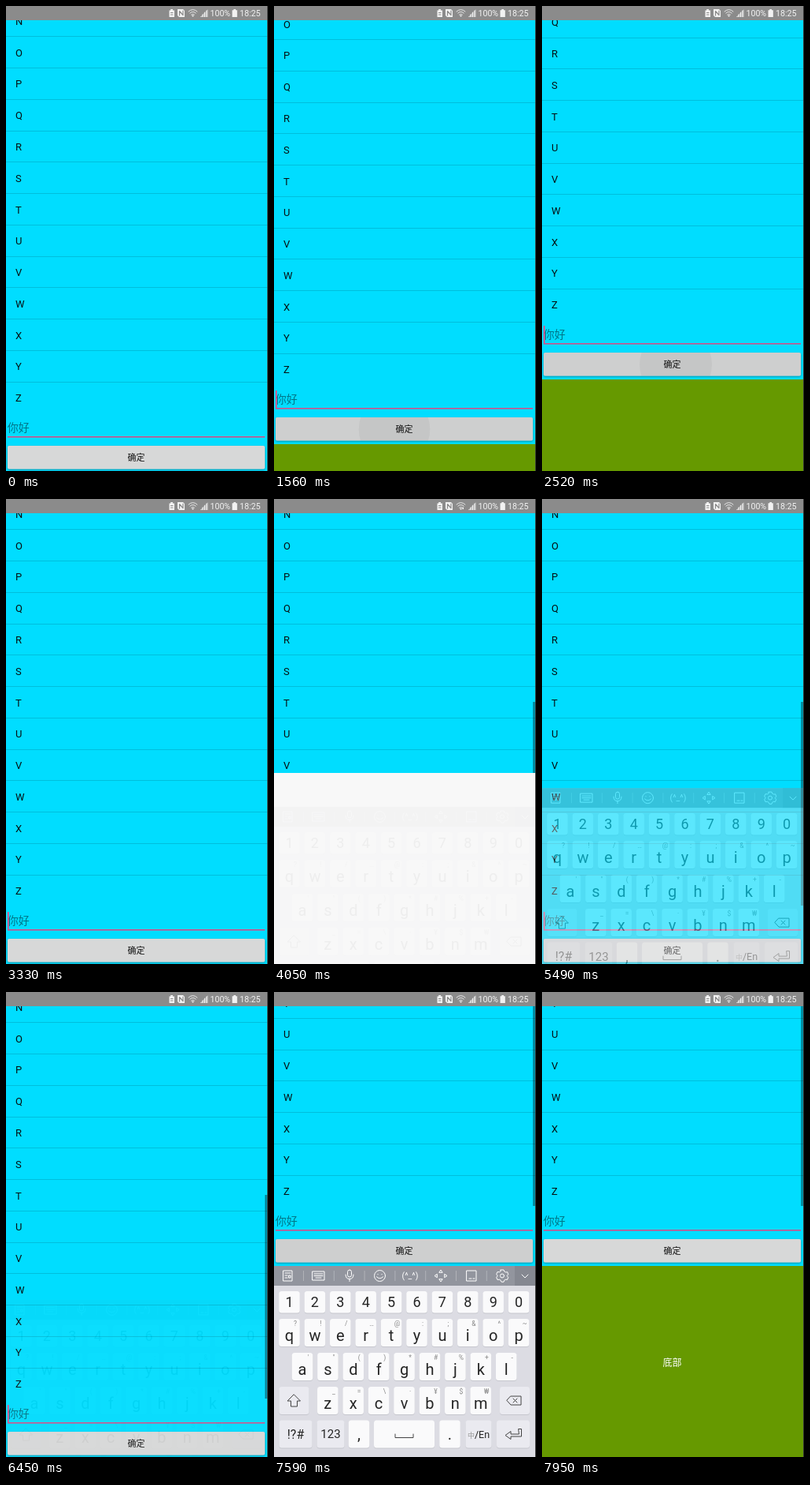
Write an HTML page that moves like this. It is 333 by 589 pixels and loops after 8000 ms.

```html
<!DOCTYPE html>
<html lang="zh-CN">
<head>
<meta charset="utf-8">
<title>List with bottom panel</title>
<style>
html, body { margin: 0; width: 100%; height: 100%; overflow: hidden; background: #f8f8f8; }
svg { display: block; width: 333px; height: 589px; }
text { font-family: Roboto, "Noto Sans CJK SC", "Noto Sans CJK", sans-serif; }
.mid { text-anchor: middle; }
.line { fill: none; stroke-linecap: round; stroke-linejoin: round; }
</style>
</head>
<body>
<svg viewBox="0 0 333 589">
  <defs>
    <clipPath id="windowClip"><rect id="windowRect" width="333" height="589"/></clipPath>
    <clipPath id="buttonClip"><rect x="2" y="557" width="327" height="29.5" rx="2"/></clipPath>
    <filter id="shadow" x="-5%" y="-30%" width="110%" height="180%">
      <feDropShadow dx="0" dy="1" stdDeviation="0.9" flood-opacity="0.4"/>
    </filter>
  </defs>
  <g clip-path="url(#windowClip)">
    <rect width="333" height="589" fill="#00ddff"/>
    <g id="content">
      <g id="rows"></g>
      <rect id="scrollbar" x="329" y="257" width="3" height="258" fill="#000" fill-opacity=".36"/>
      <text x="1.8" y="539" font-size="14" fill="#000" fill-opacity=".47">你好</text>
      <rect id="cursor" x="2" y="523" width="1.6" height="22" fill="#f0447f"/>
      <rect x="2" y="545" width="327" height="1.6" fill="#d0508a"/>
      <rect x="2" y="557" width="327" height="29.5" rx="2" fill="#d7d8d8" filter="url(#shadow)"/>
      <g clip-path="url(#buttonClip)">
        <rect id="pressed" x="2" y="557" width="327" height="30"/>
        <circle id="ripple" cy="572"/>
      </g>
      <text class="mid" x="165.5" y="576" font-size="11" fill="#111">确定</text>
    </g>
    <g id="panel">
      <rect width="333" height="244" fill="#669900"/>
      <text class="mid" x="165.5" y="127" font-size="12" fill="#fff">底部</text>
    </g>
  </g>
  <g id="keyboard"></g>
  <g id="status">
    <rect width="333" height="18" fill="#8b8b8b"/>
    <g fill="#f2f2f2">
      <path d="M207.5 5.5h1.7V4h2.8v1.5h2V14h-6.5z"/>
      <path d="M218 4h7l2 2v8h-7l-2-2z"/>
      <path d="M247 14l10-10v10z" fill-opacity=".35"/>
      <path d="M247 14l1.5-1.5V14zM249.3 14v-3l1.2-1.2V14zM251.8 14V8.5L253 7.3V14zM254.3 14V6l1.2-1.2V14z"/>
      <path d="M287.5 5.2h1.8V4h2.7v1.2h1.8V14h-6.3z"/>
      <text x="259.5" y="13.3" font-size="10.6">100%</text>
      <text x="297" y="13.3" font-size="10.6">18:25</text>
      <circle cx="237.5" cy="12.5" r="1.1"/>
      <rect id="traffic" x="239.5" y="10.5" width="1.5" height="2.5"/>
    </g>
    <g class="line" stroke="#8b8b8b" stroke-width="1.2">
      <path d="M220.5 12V6.5l4.5 5V6"/><path d="M209.5 8.5h2.5m-2.5 2.5h2.5"/>
    </g>
    <path class="line" stroke="#f2f2f2" stroke-width=".9" d="M232 7q5.5-5 11 0M233.8 9q3.7-3.3 7.4 0M235.6 11q1.9-1.7 3.8 0"/>
  </g>
  <rect x="332" width="1" height="589" fill="#333"/>
</svg>
<script>
const LOOP = 8000, TRAVEL = 244, STEP = 60, SLIDE = 300;
const KEY_PITCH = 32.4;
const $ = id => document.getElementById(id);
const set = (id, attrs) => {
  for (const name in attrs) $(id).setAttribute(name, attrs[name]);
};
const clamp = v => Math.min(1, Math.max(0, v));
const ease = v => (1 - Math.cos(Math.PI * clamp(v))) / 2;
const within = (t, spans) => spans.some(([from, to]) => t >= from && t < to);
const escapeText = s => s.replace(/&/g, '&amp;').replace(/</g, '&lt;');

function buildRows() {
  $('rows').innerHTML = [...'NOPQRSTUVWXYZ'].map((letter, i) => {
    const y = 19.3 + i * 39.77;
    const divider = letter === 'Z' ? '' :
      `<rect y="${Math.round(y + 19)}" width="333" height="1" fill="#00bedc"/>`;
    return `<text x="12" y="${y + 4.6}" font-size="13" fill="#051014">${letter}</text>${divider}`;
  }).join('');
}

function key(cx, y, w, h, label, { size = 20, control = false, hint = '' } = {}) {
  const x = cx - w / 2;
  const mark = hint &&
    `<text class="mid" x="${cx + 7.5}" y="${y + 8.5}" font-size="8.5" fill="#888">${escapeText(hint)}</text>`;
  return `<rect x="${x}" y="${y + 1}" width="${w}" height="${h}" rx="3.5" fill="#c6c7ce"/>
    <rect x="${x}" y="${y}" width="${w}" height="${h}" rx="3.5" fill="${control ? '#eaeaf0' : '#fafafb'}"/>
    <text class="mid" x="${cx}" y="${y + h / 2 + size * .36 + (hint ? 3 : 0)}" font-size="${size}" fill="#252525">${label}</text>${mark}`;
}

function keyRow(letters, hints, x, y, h, size) {
  return [...letters].map((letter, i) =>
    key(x + i * KEY_PITCH, y, 26.5, h, letter, { size, hint: hints[i] || '' })).join('');
}

function buildKeyboard() {
  const control = (cx, y, w, label = '', size = 16) =>
    key(cx, y, w, 35, label, { control: true, size });
  const separators = Array.from({ length: 7 }, (_, i) =>
    `<path d="M${37.5 + i * 38.8} 353v13" stroke="#b0b2b8"/>`).join('');
  const tools = `<g class="line" stroke="#fff">
    <path d="M12 353h11v13H12zM14 356h7m-7 3h3m-3 3h3m2-3h2v3h-2z"/>
    <path d="M49 354h15v11H49zM51 357h11m-11 2.5h11M53 362h7"/>
    <rect x="93.5" y="352" width="5" height="9" rx="2.5"/><path d="M91 358q0 5.5 5 5.5t5-5.5m-5 5.5v3"/>
    <circle cx="134.5" cy="359.5" r="7"/><path d="M132 357.5v.3m5-.3v.3m-6.5 3q4 4 8 0"/>
    <path d="M210 355l2-3 2 3zm0 9l2 3 2-3zM207 357.5l-3 2 3 2zm10 0l3 2-3 2z"/>
    <path d="M245 353h12v13h-12zM248 363h3m2 0h2"/>
    <circle cx="290" cy="359.5" r="2.5"/>
    <path d="M288 352h4l.7 2 2 1 2-.3 1 3-1.5 1.8 1.5 2-1.3 3-2.2-.3-1.5 1-.7 2h-3l-1-2-1.7-1-2.3.3-1.3-3 1.5-2-1.5-2 1.3-3 2.3.3 1.7-1z"/>
    <path d="M315 358l4 4 4-4"/></g>
    <text class="mid" x="173" y="363" font-size="10.5" fill="#fff">(^_^)</text>`;
  $('keyboard').innerHTML = `
    <rect y="347" width="333" height="245" fill="#dcdce3"/>
    <rect y="347" width="333" height="25" fill="#92959e"/>
    <rect x="306" y="347" width="27" height="25" fill="#858891"/>
    ${separators}${tools}
    ${keyRow('1234567890', '', 19.5, 379, 27.5, 18)}
    ${keyRow('qwertyuiop', '?!/…@:;&^~', 19.5, 414, 35, 20)}
    ${keyRow('asdfghjkl', '\'"()*#%+-', 36, 457, 35, 20)}
    ${control(25.5, 500, 38)}
    ${keyRow('zxcvbnm', '_=\\·¥$₩', 68.3, 500, 35, 20)}
    ${control(306, 500, 38)}
    ${control(27.5, 542.5, 42, '!?#')}
    ${control(72, 542.5, 35, '123', 15)}
    ${key(108, 542.5, 26.5, 35, ',')}
    ${key(165.5, 542.5, 77, 35, '')}
    ${key(223.5, 542.5, 26.5, 35, '.')}
    ${control(260, 542.5, 33, '<tspan fill="#999" font-size="9">中</tspan>/En', 12.5)}
    ${control(304, 542.5, 42)}
    <g class="line" stroke="#444">
      <path d="M25.5 510l8 8h-4v7h-8v-7h-4z"/>
      <path d="M301 512h13v11h-13l-5-5.5zM304 515l5 5m0-5l-5 5"/>
      <path d="M154 560v4.5h23v-4.5"/>
      <path d="M311 553.5h3.5v9.500H301v3.500l-7-5 7-5v3.500h10z"/>
    </g>`;
}

const CURSOR_ON = [[450, 960], [1410, 1920], [2400, 2850], [3330, 3780],
  [3870, 4770], [5280, 5700], [6210, 7200], [7680, 7950]];
const TYPING = [[4110, 5400], [6510, LOOP]];
const RIPPLES = [
  { start: 1410, x: 153, speed: .3, life: 450 },
  { start: 2400, x: 170, speed: .38, life: 450 },
  { start: 7590, x: 165, speed: .3, life: 330 },
];

function panelShift(t) {
  const s = Math.floor(t / STEP) * STEP;
  const open = s < 2400 ? ease((s - 1485) / SLIDE) : 1 - ease((s - 2367) / SLIDE);
  return Math.round(TRAVEL * open);
}

// Progress 0..1 of the keyboard, or null while it is hidden.
function keyboardProgress(t) {
  const stepped = start => clamp(Math.floor((t - start) / STEP) / 3);
  if (t >= 4050 && t < 5400) return stepped(4050);
  if (t >= 5400 && t < 5550) return 1 - (stepped(5400) + 1 / 3);
  if (t >= 6450 && t < 7770) return stepped(6450);
  if (t >= 7770 && t < 7950) return t < 7860 ? .6 : .15;
  return null;
}

function render(t) {
  const shift = within(t, TYPING) ? TRAVEL : panelShift(t);
  set('content', { transform: `translate(0 ${-shift})` });
  set('panel', {
    transform: `translate(0 ${591 - shift})`,
    visibility: t < 4050 || t >= 7590 ? 'visible' : 'hidden',
  });
  const resized = within(t, [[4050, 5400], [6510, 7590]]);
  set('windowRect', { height: resized ? 347 : 589 });
  set('scrollbar', { visibility: t >= 4050 ? 'visible' : 'hidden' });
  set('cursor', { visibility: within(t, CURSOR_ON) ? 'visible' : 'hidden' });
  set('traffic', { visibility: within(t, [[3600, 4590]]) ? 'visible' : 'hidden' });

  const shown = keyboardProgress(t);
  set('keyboard', {
    opacity: shown === null ? 0 : .045 + .955 * shown,
    transform: `translate(0 ${43 * (1 - (shown || 0)) ** 2})`,
  });

  const touch = RIPPLES.find(({ start, life }) => t >= start && t < start + life);
  const age = touch ? t - touch.start : 0;
  const strength = touch ? clamp((touch.life - age) / 200) : 0;
  set('pressed', { 'fill-opacity': .045 * strength });
  set('ripple', {
    cx: touch ? touch.x : 0,
    r: touch ? age * touch.speed : 0,
    'fill-opacity': .045 * strength,
  });
}

buildRows();
buildKeyboard();
const began = performance.now();
function tick() {
  render((performance.now() - began) % LOOP);
  requestAnimationFrame(tick);
}
render(0);
requestAnimationFrame(tick);
</script>
</body>
</html>
```
